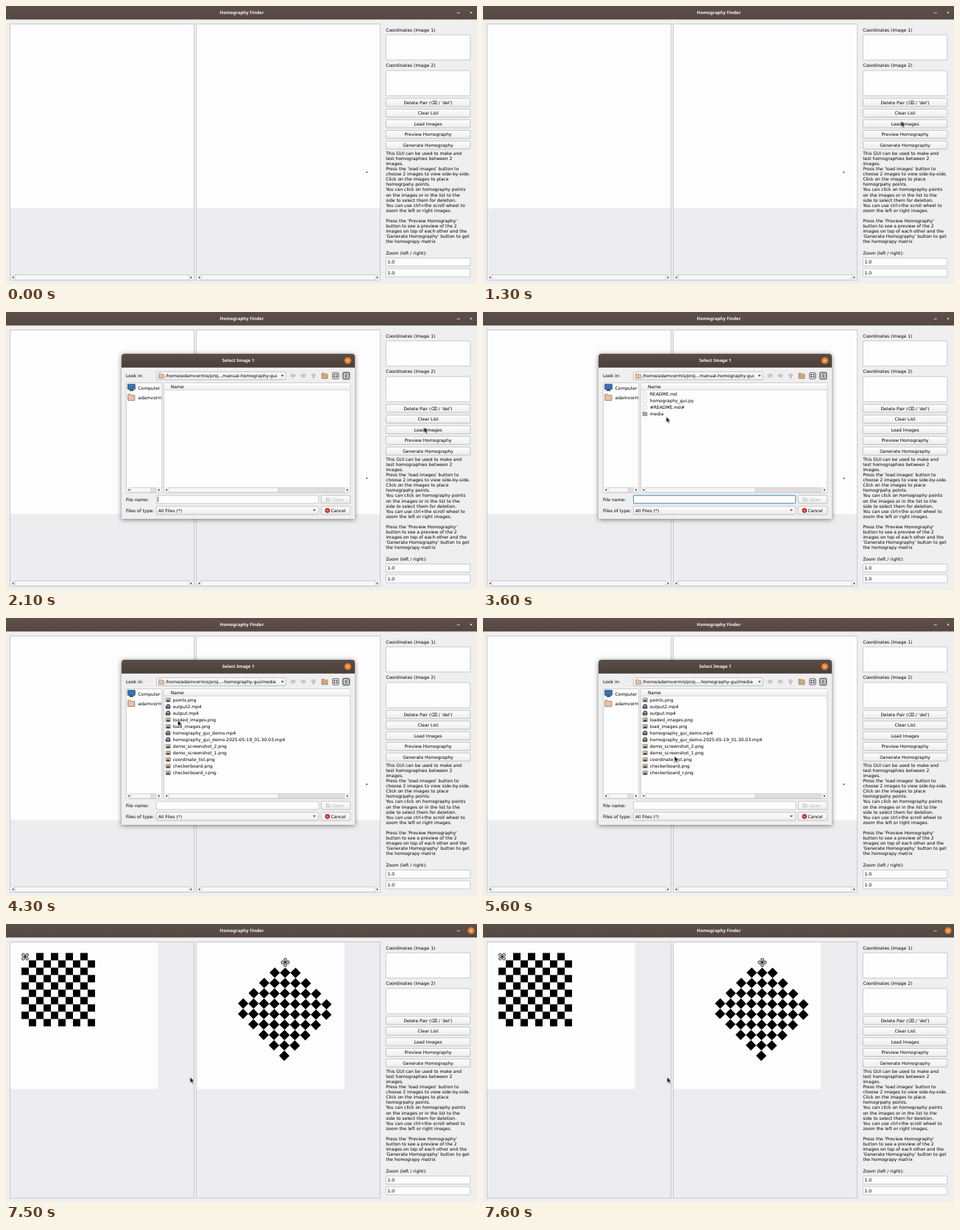
Recreate the animation shown at these times as an HTML page. Size 640x379 px, loop 8000 ms.

```html
<!DOCTYPE html>
<html lang="en">
<head>
<meta charset="utf-8">
<title>Homography Finder</title>
<style>
  html, body { margin: 0; width: 100%; height: 100%; overflow: hidden; background: #f0eff0; }
  svg { display: block; width: 100vw; height: 100vh; }
  text { font: 6px "DejaVu Sans", sans-serif; fill: #000; white-space: pre; text-rendering: geometricPrecision; }
  .title { font: bold 6px "Noto Sans", sans-serif; fill: #f7f4f2; }
  .mid { text-anchor: middle; }
  .off { fill: #bcbabb; }
  .sel text { fill: #fff; }
  .box { fill: #fefdfe; stroke: #b9b7b8; stroke-width: .7; }
  .btn { fill: url(#face); stroke: #aeacad; stroke-width: .7; }
  .line { fill: none; stroke: #f4f1ee; stroke-width: .8; }
  .tool { fill: #f6f5f6; stroke: #2b2a2b; }
  #dialog { filter: drop-shadow(0 1px 3px rgba(0,0,0,.5)); }
</style>
</head>
<body>
<svg id="stage" viewBox="0 0 640 379" preserveAspectRatio="none"></svg>
<script>
const LOOP = 8000;
const USER = 'adamvormis';

const text = (x, y, s, cls = '') => `<text x="${x}" y="${y + 2.2}" class="${cls}">${s}</text>`;
const rect = (x, y, w, h, attrs = '') => `<rect x="${x}" y="${y}" width="${w}" height="${h}" ${attrs}/>`;
const path = (d, attrs = '') => `<path d="${d}" ${attrs}/>`;
const group = (id, body, attrs = '') => `<g id="${id}" ${attrs}>${body}</g>`;
const box = (x, y, w, h) => rect(x, y, w, h, 'class="box" rx=".8"');
const face = (x, y, w, h) => rect(x, y, w, h, 'class="btn" rx="1"');
const button = (y, label) => face(516.3, y - 5.5, 114.5, 11) + text(573.5, y, label, 'mid');
const cross = (x, y) => path(`M${x - 1.3} ${y - 1.3}l2.6 2.6m0-2.6l-2.6 2.6`, 'class="line"');
const closeDot = (x, y) => `<circle cx="${x}" cy="${y}" r="4.5" fill="#e8862f"/>` + cross(x, y);
const caretDown = (x, y) => path(`M${x - 2} ${y - 1}h4l-2 2.4z`, 'fill="#444"');

function scrollbar(x, y, w, from, to) {
  return rect(x, y, w, 6.6, 'fill="#dfdddf" stroke="#c4c2c3" stroke-width=".5"')
    + rect(x, y, 7, 6.6, 'fill="#f4f3f4"') + rect(x + w - 7, y, 7, 6.6, 'fill="#f4f3f4"')
    + rect(from, y, to - from, 6.6, 'fill="#f8f7f8" stroke="#bcbabb" stroke-width=".5"')
    + path(`M${x + 4.4} ${y + 1.6}v3.4l-2-1.7z M${x + w - 4.4} ${y + 1.6}v3.4l2-1.7z`, 'fill="#333"');
}

// Icons
const folder = (x, y, color, s = 1, edge = '#8a7466') =>
  path('M-4-3.6h3l1 1.1h4v6.2h-8z', `fill="${color}" stroke="${edge}" stroke-width=".7" transform="translate(${x} ${y}) scale(${s})"`);
const icons = {
  page: y => path(`M217.8 ${y - 3}h3.2l1.4 1.4v4.8h-4.6z`, 'fill="#fafafa" stroke="#b5b3b4" stroke-width=".5"'),
  dir: y => folder(220, y, '#a5a1a0', .75),
  png: y => rect(217, y - 2.6, 6.4, 5.4, 'rx=".6" fill="#d9cdb4" stroke="#6b655e" stroke-width=".6"')
    + path(`M217.6 ${y + 2.2}l2-2.8 1.4 1.4 1-1 .8 2.4z`, 'fill="#3d3935"') + rect(220.9, y - 1.8, 1.3, 1.2, 'fill="#c57f42"'),
  mp4: y => rect(216.8, y - 1, 6.6, 4, 'rx=".8" fill="#46464a"')
    + `<circle cx="220.4" cy="${y - .5}" r="2.8" fill="#5d5e62"/><circle cx="220.2" cy="${y - .6}" r="1.2" fill="#a9abb0"/>`,
};

const rowY = i => 111.6 + i * 9.03;
const kind = name => name.endsWith('png') ? 'png' : name.endsWith('mp4') ? 'mp4' : name === 'media' ? 'dir' : 'page';
const fileRow = (name, i) => icons[kind(name)](rowY(i)) + text(226.7, rowY(i), name);
const fileList = (id, names) => group(id, names.map(fileRow).join(''));
const picked = (id, name, i) => group(id,
  group(id + 'Row', rect(214.8, rowY(i) - 4.5, 252.8, 9, 'fill="#308cc6"') + fileRow(name, i), 'class="sel"')
  + text(207, 255.4, name) + openButton(false));

function openButton(disabled) {
  return face(428.3, 250, 39.5, 11)
    + (disabled ? folder(437.6, 255.6, '#dddbdc', .7, '#c6c4c5') : folder(437.6, 255.6, '#d9a982', .7))
    + text(443, 255.4, 'Open', disabled ? 'off' : '');
}

// 10 x 10 board centred on the origin, corner rings around its first cell
function board(transform) {
  let d = '', rings = '';
  for (let r = 0; r < 10; r++)
    for (let c = r % 2; c < 10; c += 2)
      if (r + c) d += `M${c * 10 - 50} ${r * 10 - 50}h10v10h-10z`;
  for (const dx of [-2.6, 2.6]) for (const dy of [-2.6, 2.6])
    rings += `<circle cx="${dx - 45}" cy="${dy - 45}" r="1.9" fill="#d8d7d8" stroke="#3b3a3b" stroke-width="1"/>`;
  return `<g transform="${transform}">${path(d)}${rect(-46.2, -46.2, 2.4, 2.4)}${rings}</g>`;
}

const help = `This GUI can be used to make and
test homographies between 2
images.
Press the 'load images' button to
choose 2 images to view side-by-side.
Click on the images to place
homogrpahy points.
You can click on homography points
on the images or in the list to the
side to select them for deletion.
You can use ctrl+the scroll wheel to
zoom the left or right images.

Press the 'Preview Homography'
button to see a preview of the 2
images on top of each other and the
'Generate Homography' button to get
the homograpy matrix`.split('\n');

const mainWindow = rect(0, 0, 640, 379, 'fill="#f0eff0"')
  + rect(0, 0, 640, 18.4, 'fill="url(#bar)"')
  + text(320.5, 8.9, 'Homography Finder', 'title mid')
  + path('M612.8 9.4h4', 'class="line"') + cross(632, 9)
  + group('focused', closeDot(632, 9))
  + [5.7, 258.7].map(x => rect(x, 24.6, 249.7, 349.3, 'fill="#edecee" stroke="#b9b7b8" stroke-width=".7"')).join('')
  + group('blank', [5.7, 258.7].map(x =>
      rect(x + .4, 25, 249, 250.4, 'fill="#fefdfe"') + scrollbar(x + .3, 366.7, 249.1, x + 7, x + 242.5)).join('')
      + '<circle cx="490.3" cy="226.7" r=".9" fill="#3c1220"/>')
  + group('loaded', [6, 259].map(x => rect(x, 25, 200.4, 200, 'fill="#fefdfe"')).join('')
      + board('translate(71 89.6)') + board('translate(378.8 116) rotate(45.6)'))
  + text(516.2, 32.4, 'Coordinates (Image 1)') + box(516.3, 39.3, 114.5, 34.4)
  + text(516.2, 81.1, 'Coordinates (Image 2)') + box(516.3, 88, 114.5, 34.4)
  + ["Delete Pair (⌫ / 'del')", 'Clear List', 'Load Images', 'Preview Homography', 'Generate Homography']
      .map((label, i) => button(131.5 + i * 14.52, label)).join('')
  + group('pressed', rect(516.3, 155, 114.5, 11, 'rx="1" fill="#000" opacity=".12"'))
  + help.map((s, i) => text(516.2, 201 + i * 7.04, s)).join('')
  + text(516.2, 336.4, 'Zoom (left / right):')
  + [349.1, 363.6].map(y => box(516.3, y - 5.5, 114.5, 11) + text(518.6, y, '1.0')).join('');

const arrow = (x, d) => path(d, `transform="translate(${x} 86.8)" fill="#d2d0d1" stroke="#a3a1a2" stroke-width=".6"`);
const toolbar = arrow(390, 'M-3.4 0l3-3v1.8h3.4v2.2h-3.4v2z')
  + arrow(404, 'M3.4 0l-3-3v1.8h-3.4v2.2h3.4v2z')
  + arrow(418, 'M0-3.4l3 3h-1.8v3.4h-2.4v-3.4h-1.8z')
  + folder(433, 87, '#d2a77e') + '<circle cx="435.6" cy="84.6" r="1.4" fill="#e9b94d"/>'
  + rect(443.8, 82.8, 8.2, 8.2, 'rx="1.2" class="tool" stroke-width=".8"')
  + path('M445.3 85.6h2m1.200 0h2m-5.200 2.700h2m1.200 0h2', 'stroke="#222" stroke-width="1.500"')
  + rect(456.8, 81.6, 10.8, 10.8, 'rx="1" fill="#d6d4d5" stroke="#aaa8a9" stroke-width=".5"')
  + rect(458.1, 82.8, 8.2, 8.2, 'rx="1.2" class="tool" stroke-width="1"')
  + path('M460 85.200h4.400m-4.400 1.700h4.400m-4.400 1.700h4.400', 'stroke="#222" stroke-width=".8"');

const dialog = path('M157 282V61q0-4 4-4h309q4 0 4 4v221z', 'fill="#f0eff0"')
  + path('M157 75.800V61q0-4 4-4h309q4 0 4 4v14.800z', 'fill="url(#bar2)"')
  + group('title1', text(315.6, 66.2, 'Select Image 1', 'title mid'))
  + group('title2', text(315.6, 66.2, 'Select Image 2', 'title mid'))
  + closeDot(464.4, 66.2)
  + text(163, 87, 'Look in:')
  + face(204.4, 81.6, 176, 10.8) + folder(211, 87, '#e3c09f', .85) + caretDown(375.6, 86.8)
  + group('rootPath', text(216.8, 87, `/home/${USER}/proj...manual-homography-gui`))
  + group('mediaPath', text(216.8, 87, `/home/${USER}/proj...-homography-gui/media`))
  + toolbar
  + box(163.3, 96.6, 48.5, 149.6)
  + rect(165.4, 98.4, 10, 7, 'rx=".5" fill="#2f75bd" stroke="#26364a" stroke-width=".7"')
  + path('M168.500 105.600h4l1 2.200h-6z', 'fill="#48484a"') + folder(170.3, 116.3, '#e6c3a4', 1.15)
  + `<g clip-path="url(#side)">${text(179.6, 103.4, 'Computer')}${text(179.6, 116.5, USER)}</g>`
  + scrollbar(163.6, 239.3, 47.9, 170, 197)
  + box(214.4, 96.6, 253.4, 149.6)
  + rect(214.8, 97, 252.7, 9.3, 'fill="url(#face)"') + path('M214.800 106.400h252.700', 'stroke="#c4c2c3" stroke-width=".6"')
  + text(224, 101.6, 'Name')
  + fileList('rootFiles', ['README.md', 'homography_gui.py', '#README.md#', 'media'])
  + fileList('mediaFiles', ['points.png', 'output2.mp4', 'output.mp4', 'loaded_images.png', 'load_images.png',
      'homography_gui_demo.mp4', 'homography_gui_demo-2025-05-19_01.30.03.mp4', 'demo_screenshot_2.png',
      'demo_screenshot_1.png', 'coordinate_list.png', 'checkerboard.png', 'checkerboard_r.png'])
  + scrollbar(214.7, 239.3, 252.8, 221.5, 370)
  + text(163, 255.4, 'File name:') + box(204.4, 250, 220.4, 11)
  + group('glow', rect(204.5, 250.1, 220.2, 10.8, 'rx="1" fill="none" stroke="#4a9ccb" stroke-width="1"'))
  + group('caret', path('M206.500 251.800v7.400', 'stroke="#111" stroke-width=".7"'))
  + openButton(true)
  + picked('pickMedia', 'media', 3) + picked('pickFirst', 'checkerboard.png', 10) + picked('pickSecond', 'checkerboard_r.png', 11)
  + text(163, 270.4, 'Files of type:') + face(204.4, 265, 220.4, 11) + text(207, 270.4, 'All Files (*)') + caretDown(419, 270.2)
  + face(428.3, 265, 39.5, 11) + '<circle cx="436.800" cy="270.600" r="3.300" fill="#c4211f"/>'
  + cross(436.8, 270.6) + text(441.4, 270.4, 'Cancel');

const gradient = (id, top, bottom) =>
  `<linearGradient id="${id}" x2="0" y2="1"><stop stop-color="${top}"/><stop offset="1" stop-color="${bottom}"/></linearGradient>`;

document.getElementById('stage').innerHTML =
  `<defs>${gradient('bar', '#5d504a', '#554842')}${gradient('bar2', '#5b4e48', '#4a3f39')}${gradient('face', '#fefefe', '#eeecee')}
  <clipPath id="side">${rect(163, 96, 48.4, 143)}</clipPath></defs>`
  + mainWindow + group('dialog', dialog)
  + group('cursor', path('M-.6-.8v8l1.900-1.700 1.300 2.900 1.500-.7-1.300-2.800h2.500z', 'fill="#111" stroke="#fff" stroke-width=".6"'));

// Holds each value until the next entry's time
function steps(id, prop, table) {
  const frames = table.map(([t, v]) => ({ offset: t / LOOP, [prop]: v, easing: 'steps(1, end)' }));
  frames.push({ offset: 1, [prop]: table[table.length - 1][1] });
  document.getElementById(id).animate(frames, { duration: LOOP, iterations: Infinity });
}
const fade = (id, ...table) => steps(id, 'opacity', [[0, 0], ...table]);
const show = (id, ...spans) => fade(id, ...spans.flatMap(([from, to]) => to < LOOP ? [[from, 1], [to, 0]] : [[from, 1]]));
const hideAt = (id, t) => steps(id, 'opacity', [[0, 1], [t, 0]]);

fade('dialog', [1800, .35], [1900, .75], [2000, 1], [7400, .5], [7500, 0]);
show('focused', [1700, 2100], [7400, LOOP]);
show('pressed', [1700, 1800]);
hideAt('blank', 7500);
show('loaded', [7500, LOOP]);
hideAt('title1', 6600);
show('title2', [6600, LOOP]);
hideAt('rootPath', 4200);
show('mediaPath', [4200, LOOP]);
show('rootFiles', [2700, 4200]);
show('mediaFiles', [4300, LOOP]);
show('glow', [2700, 4000], [6600, 7100]);
show('caret', [1800, 2700], [6600, 7100]);
show('pickMedia', [4000, 4200]);
show('pickFirst', [6200, 6600]);
show('pickSecond', [7300, LOOP]);

// Pointer moves: start time, then one position per 100 ms
const moves = [
  [0, [660, 190]],
  [600, [636, 183], [622, 182], [607, 179], [592, 174], [581, 168], [574, 162], [570, 158], [568.6, 157.6]],
  [2700, [520, 150], [410, 138], [290, 120], [214, 113]],
  [3300, [178, 112], [168, 124], [212, 138], [249.4, 143.4], [247, 143], [243, 142], [238, 141], [235, 140], [234, 140]],
  [4700, [237, 148], [243, 163], [249, 178], [252, 186]],
  [5300, [254, 186], [257, 187], [260, 188], [260.6, 189], [259, 191], [256, 193], [252, 196], [247, 198], [245, 199]],
  [6700, [252, 185]],
  [6900, [251, 197], [249.4, 207], [250.6, 209.4]],
];
steps('cursor', 'transform', moves.flatMap(([start, ...points]) =>
  points.map(([x, y], i) => [start + i * 100, `translate(${x}px, ${y}px)`])));
</script>
</body>
</html>
```
